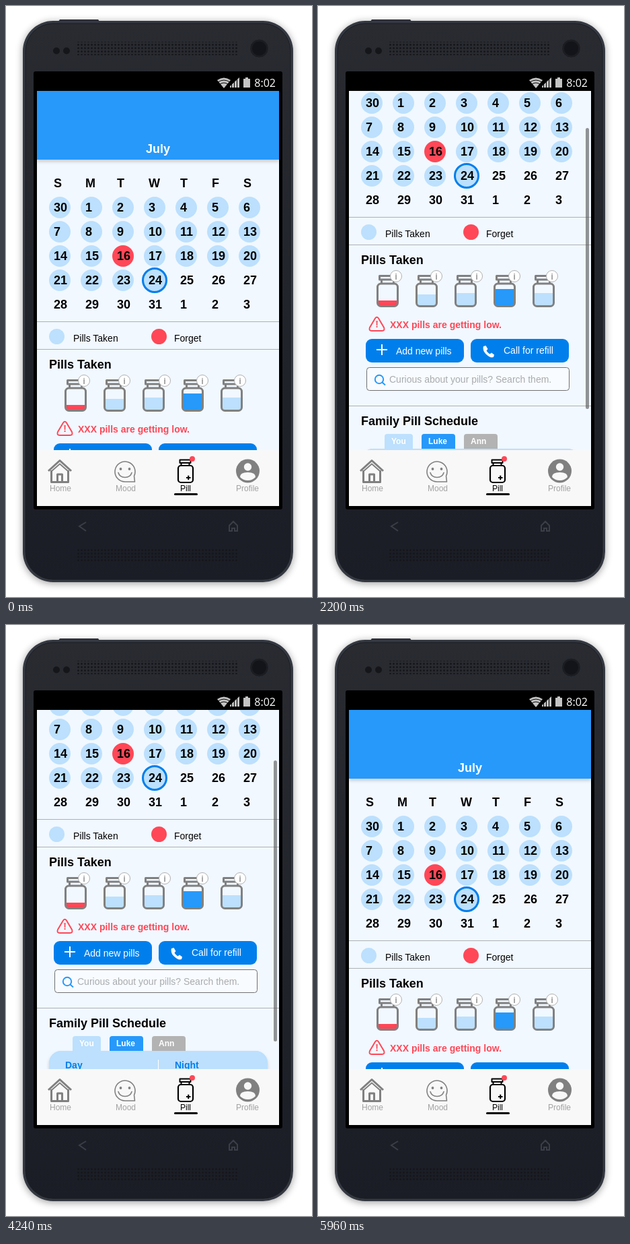
These frames come from a looping animation (455x877 px, 6190 ms). An HTML page:

```html
<!DOCTYPE html>
<html lang="en">
<head>
<meta charset="utf-8">
<title>Pill calendar</title>
<style>
  html, body { margin: 0; width: 100%; height: 100%; overflow: hidden; background: #fff; }
  svg { display: block; width: 100vw; height: 100vh; }
  text { font-family: "Liberation Sans", Arial, sans-serif; white-space: pre; }
</style>
</head>
<body>
<svg id="stage" viewBox="0 0 455 877" xmlns="http://www.w3.org/2000/svg">
  <defs>
    <linearGradient id="face" x1="0" y1="0" x2="0" y2="1">
      <stop offset="0" stop-color="#292b31"/>
      <stop offset=".5" stop-color="#22242b"/>
      <stop offset="1" stop-color="#1b1d26"/>
    </linearGradient>
    <pattern id="holes" width="5" height="5" patternUnits="userSpaceOnUse">
      <circle cx="2.5" cy="2.5" r="1.5" fill="#15161a"/>
    </pattern>
    <filter id="glow" x="-10%" y="-10%" width="120%" height="120%"><feGaussianBlur stdDeviation="6"/></filter>
    <filter id="drop" x="-10%" y="-20%" width="120%" height="150%">
      <feDropShadow dx="0" dy="3" stdDeviation="2.5" flood-color="#000" flood-opacity=".18"/>
    </filter>
    <clipPath id="view"><rect x="46" y="126" width="360" height="533"/></clipPath>
  </defs>

  <g id="phone">
    <rect x="25" y="24" width="402" height="833" rx="45" fill="#000" opacity=".38" filter="url(#glow)"/>
    <path d="M77 24l3-4h57l3 4z" fill="#2c2f38"/>
    <rect x="25" y="22" width="402" height="833" rx="45" fill="#343841"/>
    <rect x="29" y="26" width="394" height="825" rx="41" fill="url(#face)" stroke="#1b1d22"/>
    <circle cx="75" cy="66.500" r="5" fill="#15161a"/>
    <circle cx="90" cy="66.500" r="5" fill="#15161a"/>
    <rect x="105" y="53" width="240" height="20" fill="url(#holes)"/>
    <rect x="106" y="806" width="240" height="20" fill="url(#holes)"/>
    <circle cx="376.500" cy="63" r="14" fill="#1c1d22" stroke="#2b2e35"/>
    <circle cx="376.500" cy="63" r="10.500" fill="#131419"/>
    <path d="M119 766l-10 6 10 7M332 771l6-6 6 6v8h-4v-4h-4v4h-4z" fill="none" stroke="#3b3e47" stroke-width="2"/>
    <rect x="41" y="97" width="370" height="650" rx="3"/>
    <rect x="46" y="126" width="360" height="616" fill="#f1f8ff"/>
  </g>

  <g id="status">
    <path d="M314 110q10-7 20 0l-10 12z" fill="#c4c4c4"/>
    <path d="M315 113q9-6 18 0M318 116q6-4 12 0" fill="none" stroke="#000"/>
    <path d="M333 121v-2l14-13v15z" fill="#c4c4c4"/>
    <path d="M335.500 105v17M339.500 105v17M343.500 105v17" stroke="#000"/>
    <path d="M353 108h3v-2h4v2h3v13h-10z" fill="#c4c4c4"/>
  </g>

  <g clip-path="url(#view)"><g id="page"></g></g>
  <rect id="bar" x="398" y="126" width="5" height="417" rx="2.500" fill="#505050" fill-opacity=".6"/>
  <g id="nav"></g>
</svg>
<script>
const LIGHT = '#bce0fd', BLUE = '#2699fb', DEEP = '#007fec', RED = '#ff4757', GRAY = '#808080';
const $ = id => document.getElementById(id);

const text = (x, y, str, size = 14, fill = '#000', extra = '') =>
  `<text x="${x}" y="${y}" font-size="${size}" fill="${fill}" ${extra}>${str}</text>`;
const bold = (x, y, str, size = 18, fill = '#000', extra = '') =>
  text(x, y, str, size, fill, 'font-weight="700" ' + extra);
const rect = (x, y, w, h, fill, extra = '') =>
  `<rect x="${x}" y="${y}" width="${w}" height="${h}" fill="${fill}" ${extra}/>`;
const dot = (x, y, r, fill, extra = '') =>
  `<circle cx="${x}" cy="${y}" r="${r}" fill="${fill}" ${extra}/>`;
const line = (d, color, width, extra = '') =>
  `<path d="${d}" fill="none" stroke="${color}" stroke-width="${width}" ${extra}/>`;
const rule = y => line(`M46 ${y}h360`, '#adb1b5', 1);
const ROUND = 'stroke-linecap="round" stroke-linejoin="round"';

function calendar() {
  let out = [...'SMTWTFS'].map((d, i) => bold(71 + 47 * i, 269, d)).join('');
  for (let i = 0; i < 35; i++) {
    const col = i % 7, row = Math.floor(i / 7);
    const x = 80 + 47 * col, y = 299 + 36 * row;
    const day = i === 0 ? 30 : (i - 1) % 31 + 1;
    if (i === 24) out += dot(x, y, 17.5, LIGHT, `stroke="${DEEP}" stroke-width="3"`);
    else if (i < 24) out += dot(x, y, 16, i === 16 ? RED : LIGHT);
    out += bold(x - 9, y + 6, day);
  }
  return out;
}

function bottle(x, infoX, level, color) {
  return `<path d="M${x - 15} ${level}h30v${596 - level}q0 4-4 4h-22q-4 0-4-4z" fill="${color}"/>` +
    line(`M${x - 12} 555.500h24v5.500h-24zM${x - 9} 561v6M${x + 9} 561v6`, GRAY, 3, 'stroke-linejoin="round"') +
    rect(x - 15, 567, 30, 33.5, 'none', `rx="5" stroke="${GRAY}" stroke-width="3"`) +
    dot(infoX, 556, 8.5, '#fff', 'stroke="#b0b0b0"') +
    bold(infoX, 560.5, 'i', 13, '#a0a0a0', 'text-anchor="middle"');
}

const tab = (x, w, fill, name) =>
  `<path d="M${x} 813v-19q0-4 4-4h${w - 8}q4 0 4 4v19z" fill="${fill}"/>` + bold(x + 10, 805, name, 12, '#fff');

const dose = (x, y, time, unit) =>
  rect(x + .5, y + .5, 18, 18, '#fff', 'stroke="#a5a5a5"') +
  line(`M${x + 3.5} ${y + 9}l4.500 5 8-9`, '#999', 2) +
  bold(x + 37, y + 15, `${time}<tspan font-size="14">${unit}</tspan>`, 20, '#fff');

function page() {
  return rect(46, 26, 360, 202, BLUE, 'filter="url(#drop)"') +
    bold(226, 218, 'July', 18, '#fff', 'text-anchor="middle"') +
    calendar() +
    rule(468.5) + rule(509.5) +
    dot(75.5, 490.5, 11.5, LIGHT) + text(100, 498, 'Pills Taken') +
    dot(227.5, 490.5, 11.5, RED) + text(250, 498, 'Forget') +
    bold(64, 538, 'Pills Taken') +
    bottle(103.5, 116, 592, RED) + bottle(161.5, 176, 583, LIGHT) + bottle(219.5, 236, 581, LIGHT) +
    bottle(277.5, 292, 575, BLUE) + bottle(335.5, 348, 581, LIGHT) +
    line('M85 618.500q2.500-3.500 5 0l8 13.500q2 5-3 5h-15q-5 0-3-5z', RED, 2) +
    bold(87.5, 632, '!', 14, RED, 'text-anchor="middle"') +
    bold(107, 633, 'XXX pills are getting low.', 14, RED) +
    rect(71, 649, 146, 35, DEEP, 'rx="9"') + rect(227, 649, 146, 35, DEEP, 'rx="9"') +
    line('M87 665h16M95 657v16', '#fff', 2) + text(116, 672, 'Add new pills', 14, '#fff') +
    '<path d="M246 660l3.500-1 3 5-2 2.500q1.500 3 5 5l2.500-2 4 3-1 3.500q-4 1.500-9-2.500-8-6-6-13.500z" fill="#fff"/>' +
    text(276, 671, 'Call for refill', 14, '#fff') +
    rect(72.5, 691.5, 301, 34, '#f8fbff', 'rx="4" stroke="#707070"') +
    dot(91, 709, 6.2, 'none', `stroke="${BLUE}" stroke-width="2"`) + line('M95.500 713.500l4.500 4', BLUE, 2) +
    text(106, 714, 'Curious about your pills? Search them.', 14, '#a9abad') +
    rule(748.5) +
    bold(64, 777, 'Family Pill Schedule') +
    rect(64, 812, 325, 129, LIGHT, 'rx="18" filter="url(#drop)"') +
    tab(99, 42, LIGHT, 'You') + tab(154, 50, BLUE, 'Luke') + tab(217, 50, '#b3b3b3', 'Ann') +
    rect(64, 812, 325, 129, LIGHT, 'rx="18"') +
    line('M226.500 825v103', '#fff', 1) +
    bold(88, 838, 'Day', 14, DEEP) + bold(251, 838, 'Night', 14, DEEP) +
    dose(88, 857, '8:00', 'am') + dose(88, 897, '12:00', 'am') + dose(253, 857, '6:00p', 'm');
}

function nav() {
  const label = (x, str, fill = '#a3a3a3') => text(x, 720, str, 12, fill);
  return rect(46, 659, 360, 83, '#f8f8f8') +
    line('M63 690l17-15.500 17 15.500M67.500 689v17.500h25v-17.500M76.500 706v-11h7v11', GRAY, 3, 'stroke-linejoin="round"') +
    line('M67.500 690.500l12.500-11 12.500 11', GRAY, 2) + label(65, 'Home') +
    line('M191.500 706h-14.500a15 15 0 1 1 13.500-8.500z', GRAY, 1.6, ROUND) +
    dot(170.5, 687, 1.9, GRAY) + dot(183.5, 687, 1.9, GRAY) +
    line('M167 692.500q2 7 10 7t10-7', GRAY, 1.6, ROUND) + label(163, 'Mood') +
    line('M258.500 673.500h16v4.500h-16zM260.500 678v4M272.500 678v4', '#000', 2, ROUND) +
    rect(256, 682, 22, 25, 'none', 'rx="4" stroke="#000" stroke-width="2.200"') +
    line('M268 700h6.500M271.250 696.750v6.500', '#000', 2) +
    dot(277, 672, 4, RED) + label(259, 'Pill', '#000') +
    rect(250, 723, 35, 3, '#000', 'rx="1.500"') +
    dot(359.5, 690, 17.5, GRAY) + dot(359.5, 684, 5.7, '#f8f8f8') +
    '<path d="M348 699q0-7 11.500-7t11.500 7q-4.500 5-11.500 5t-11.500-5z" fill="#f8f8f8"/>' + label(342, 'Profile');
}

$('page').innerHTML = page();
$('nav').innerHTML = nav();
$('status').innerHTML += text(401, 120, '8:02', 16, '#fff', 'text-anchor="end" style="font-family:\'Open Sans\',sans-serif"');

const LOOP = 6190, MAX_SCROLL = 293, BAR_TRAVEL = 111, BAR_LAG = 50;

// Bursts of redraws: start, end, count
const BURSTS = [[1510, 1690, 5], [1870, 2480, 12], [2530, 2580, 2], [3960, 4570, 14], [4600, 4750, 4]];

// Scroll position: time, offset
const SCROLL = [[1460, 11], [1510, 11], [1690, 70], [1870, 82], [2150, 145], [2200, 154], [2480, 272],
  [2530, 291], [2580, 293], [3910, 293], [3960, 282], [4470, 98], [4520, 86], [4570, 68], [4700, 1], [4750, 0]];

// Scrollbar: appears, starts fading, gone, fade steps
const BAR = [[80, 640, 820, 4], [1510, 3040, 3350, 5], [3960, 5630, 5960, 5]];

const stepIndex = (t, start, end, count) =>
  Math.min(count - 1, Math.floor((t - start) / (end - start) * (count - 1) + 0.1));

function drawTime(t) {
  const burst = BURSTS.filter(b => t >= b[0]).pop();
  if (!burst) return 0;
  const [start, end, count] = burst;
  return start + stepIndex(t, start, end, count) * (end - start) / (count - 1);
}

function scrollAt(t) {
  if (t < SCROLL[0][0]) return 0;
  const next = SCROLL.findIndex(k => k[0] > t);
  if (next < 0) return 0;
  const [t0, a] = SCROLL[next - 1], [t1, b] = SCROLL[next];
  return a + (b - a) * (t - t0) / (t1 - t0);
}

function barOpacity(t) {
  const phase = BAR.filter(b => t >= b[0]).pop();
  if (!phase) return 0;
  const [, fade, gone, count] = phase;
  return t < fade ? 1 : 1 - (stepIndex(t, fade, gone, count) + 1) / count;
}

function render(t) {
  const drawn = drawTime(t);
  const barY = scrollAt(drawn - BAR_LAG) / MAX_SCROLL * BAR_TRAVEL;
  $('page').setAttribute('transform', `translate(0 ${-Math.round(scrollAt(drawn))})`);
  $('bar').setAttribute('y', 126 + Math.round(barY));
  $('bar').setAttribute('opacity', barOpacity(t));
}

const began = performance.now();
function tick() {
  render((performance.now() - began) % LOOP);
  requestAnimationFrame(tick);
}
tick();
</script>
</body>
</html>
```
